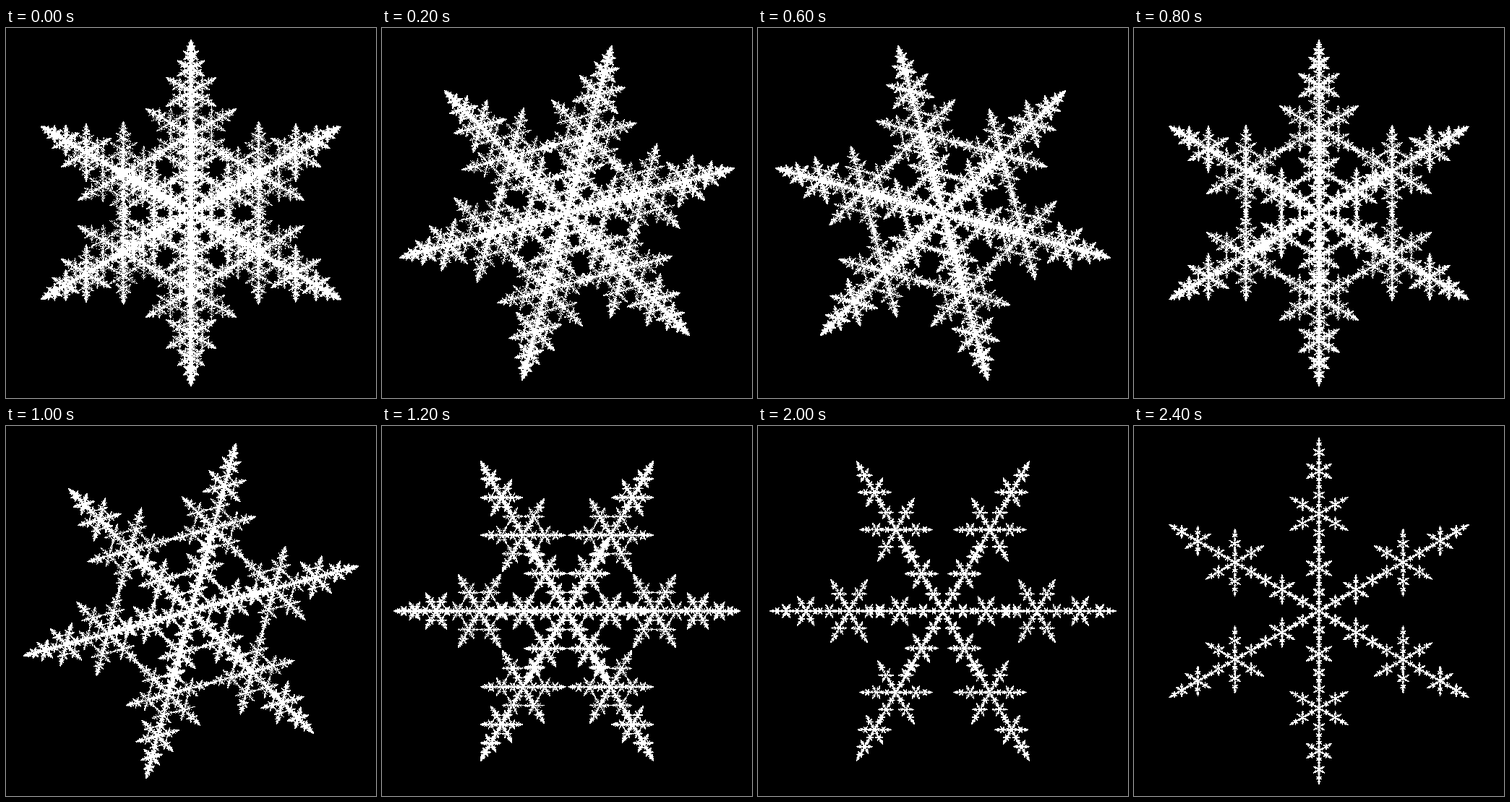
Recreate the animation shown at these times as an HTML page with a canvas. Size 512 by 512 pixels, loop 2.5 s.

```html
<!DOCTYPE html>
<html lang="en">
<head>
<meta charset="utf-8">
<title>Snowflake</title>
<style>
  html, body { margin: 0; width: 100%; height: 100%; overflow: hidden; background: #000; }
  canvas { display: block; width: 512px; height: 512px; }
</style>
</head>
<body>
<canvas id="stage" width="512" height="512"></canvas>
<script>
const SIZE = 512, CENTER = 256, RADIUS = 240;
const STEPS = 25, STEP_MS = 100, POINTS = 300000;
const STAY_AT_CENTER = 0.4, STAY_AT_TIP = 0.5;
const BLACK = 0xff000000, WHITE = 0xffffffff;

const ctx = document.getElementById('stage').getContext('2d');
const image = ctx.createImageData(SIZE, SIZE);
const pixels = new Uint32Array(image.data.buffer);

function seededRandom(seed) {
  return () => {
    seed = (seed + 0x6d2b79f5) | 0;
    let t = Math.imul(seed ^ (seed >>> 15), 1 | seed);
    t = (t + Math.imul(t ^ (t >>> 7), 61 | t)) ^ t;
    return ((t ^ (t >>> 14)) >>> 0) / 4294967296;
  };
}

// Attractors: the centre (0) and six tips (1 to 6).
// From the centre any may follow; from a tip only itself or the centre.
function makeChoices() {
  const random = seededRandom(7);
  const choices = new Uint8Array(POINTS);
  let current = 0;
  for (let i = 0; i < POINTS; i++) {
    const stay = current === 0 ? STAY_AT_CENTER : STAY_AT_TIP;
    if (random() >= stay) current = current === 0 ? 1 + Math.floor(random() * 6) : 0;
    choices[i] = current;
  }
  return choices;
}
const choices = makeChoices();

function draw(step) {
  const progress = step / (STEPS - 1);
  const ratio = 0.55 - 0.11 * progress;
  const turn = Math.PI * progress - Math.PI / 2;
  const pullX = [0], pullY = [0];
  for (let i = 0; i < 6; i++) {
    const angle = turn + i * Math.PI / 3;
    pullX.push((1 - ratio) * RADIUS * Math.cos(angle));
    pullY.push((1 - ratio) * RADIUS * Math.sin(angle));
  }
  pixels.fill(BLACK);
  let x = 0, y = 0;
  for (const choice of choices) {
    x = x * ratio + pullX[choice];
    y = y * ratio + pullY[choice];
    pixels[Math.floor(CENTER + y) * SIZE + Math.floor(CENTER + x)] = WHITE;
  }
  ctx.putImageData(image, 0, 0);
}

let shown = -1;
const start = performance.now();
function tick() {
  const step = Math.floor((performance.now() - start) / STEP_MS) % STEPS;
  if (step !== shown) draw(shown = step);
  requestAnimationFrame(tick);
}
tick();
</script>
</body>
</html>
```
